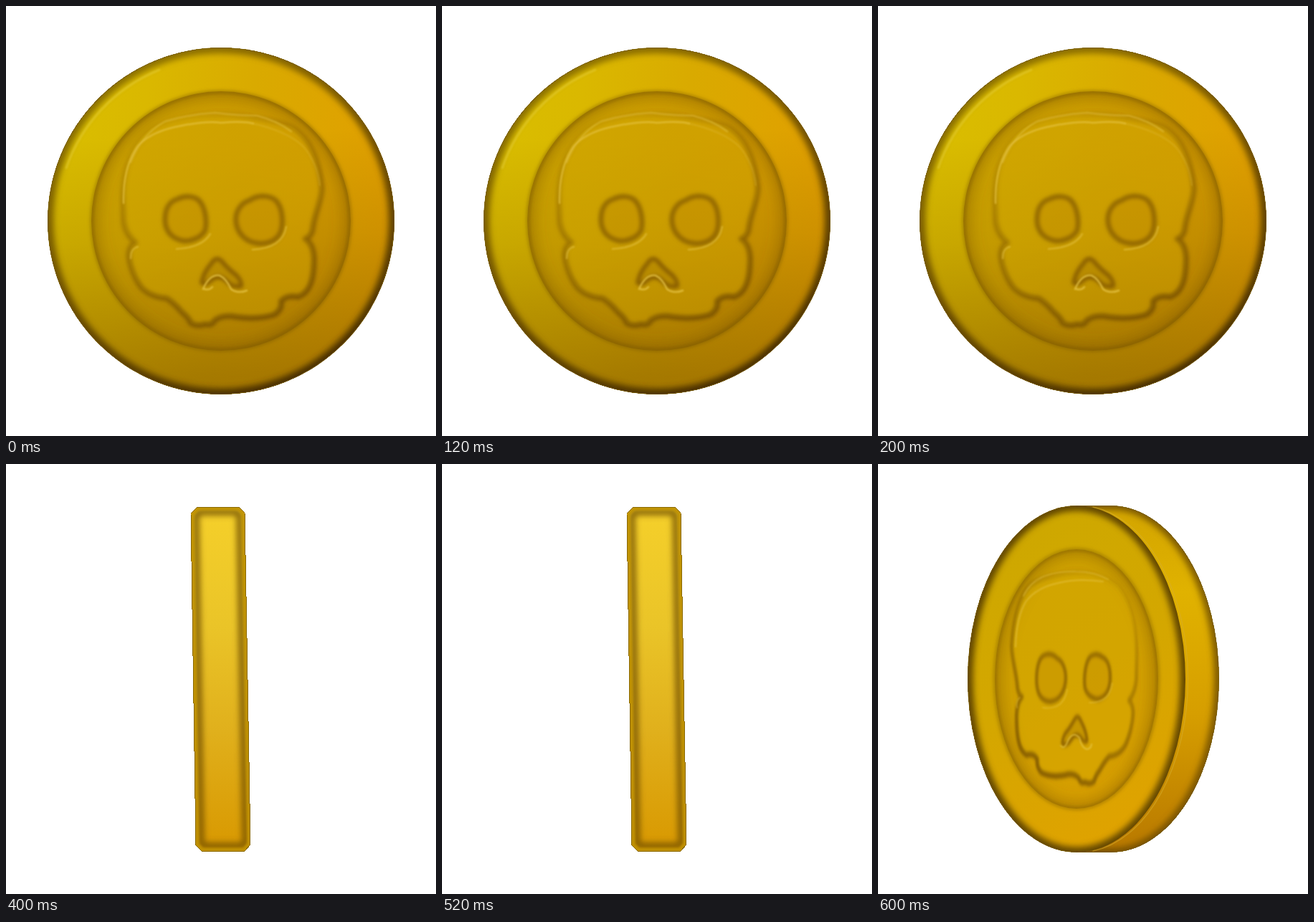
Write an HTML page that moves like this. It is 600 px wide and 600 px high and loops after 0.8 s.

```html
<!DOCTYPE html>
<html lang="en">
<head>
<meta charset="utf-8">
<title>Spinning coin</title>
<style>
  html, body { margin: 0; width: 100%; height: 100%; overflow: hidden; background: #fff; }
  svg { display: block; width: 100vw; height: 100vh; }
  .pose { visibility: hidden; animation: 800ms step-end infinite; }
  .front { animation-name: front; }
  .edge { animation-name: edge; }
  .tilt { animation-name: tilt; }
  @keyframes front { 0% { visibility: visible; } 50%, 100% { visibility: hidden; } }
  @keyframes edge { 0% { visibility: hidden; } 50% { visibility: visible; } 75%, 100% { visibility: hidden; } }
  @keyframes tilt { 0% { visibility: hidden; } 75%, 100% { visibility: visible; } }
  .line { fill: none; stroke-linecap: round; stroke-linejoin: round; }
  .crisp { shape-rendering: crispEdges; }
</style>
</head>
<body>
<svg viewBox="0 0 600 600">
  <defs>
    <filter id="b1" x="-20%" y="-20%" width="140%" height="140%"><feGaussianBlur stdDeviation="1"/></filter>
    <filter id="b2" x="-20%" y="-20%" width="140%" height="140%"><feGaussianBlur stdDeviation="2.6"/></filter>
    <filter id="b4" x="-20%" y="-20%" width="140%" height="140%"><feGaussianBlur stdDeviation="4"/></filter>
    <filter id="b10" x="-20%" y="-20%" width="140%" height="140%"><feGaussianBlur stdDeviation="10"/></filter>

    <linearGradient id="gold" x1="0" y1=".35" x2="1" y2=".5">
      <stop offset="0" stop-color="#d9be00"/>
      <stop offset=".25" stop-color="#dab800"/>
      <stop offset=".55" stop-color="#d9aa00"/>
      <stop offset="1" stop-color="#e29e00"/>
    </linearGradient>
    <linearGradient id="fall" x1=".48" y1="0" x2=".52" y2="1">
      <stop offset=".25" stop-color="#8a6000" stop-opacity="0"/>
      <stop offset=".55" stop-color="#8a6000" stop-opacity=".22"/>
      <stop offset=".95" stop-color="#8a6000" stop-opacity=".66"/>
    </linearGradient>
    <linearGradient id="rim" x1=".2" y1="0" x2=".7" y2="1">
      <stop offset="0" stop-color="#7a6000" stop-opacity=".75"/>
      <stop offset=".5" stop-color="#664800" stop-opacity=".9"/>
      <stop offset="1" stop-color="#452c00"/>
    </linearGradient>
    <linearGradient id="dish" x1=".35" y1="0" x2=".6" y2="1">
      <stop offset="0" stop-color="#bc8800" stop-opacity=".5"/>
      <stop offset=".5" stop-color="#bc8a00" stop-opacity=".42"/>
      <stop offset="1" stop-color="#a87600" stop-opacity=".35"/>
    </linearGradient>
    <linearGradient id="carve" x1=".2" y1="0" x2=".6" y2="1">
      <stop offset="0" stop-color="#8a6000" stop-opacity=".1"/>
      <stop offset=".35" stop-color="#805800" stop-opacity=".4"/>
      <stop offset="1" stop-color="#704a00" stop-opacity=".75"/>
    </linearGradient>
    <linearGradient id="bar" x1="0" y1="0" x2="0" y2="1">
      <stop offset="0" stop-color="#f5d02a"/>
      <stop offset=".35" stop-color="#eac428"/>
      <stop offset=".65" stop-color="#e0b01c"/>
      <stop offset="1" stop-color="#d89800"/>
    </linearGradient>
    <linearGradient id="warm" x1=".3" y1="0" x2=".65" y2="1">
      <stop offset="0" stop-color="#cda800"/>
      <stop offset=".5" stop-color="#d4a700"/>
      <stop offset="1" stop-color="#e0a200"/>
    </linearGradient>
    <linearGradient id="side" x1="0" y1="0" x2="0" y2="1">
      <stop offset="0" stop-color="#d2a400"/>
      <stop offset=".25" stop-color="#e0b200"/>
      <stop offset=".6" stop-color="#d69e00"/>
      <stop offset="1" stop-color="#b87800"/>
    </linearGradient>

    <path id="skull" d="M163 270C162 230 172 194 204 170C232 155 268 151 296 151C330 152 372 157 398 168C426 183 438 220 441 254C440 276 430 290 428 312Q426 322 418 325Q429 332 430 352C430 380 425 400 408 406Q392 403 384 412Q386 424 374 431Q350 438 322 434Q304 430 292 438Q287 447 278 444Q268 448 258 443Q254 434 246 428Q234 414 224 408Q200 406 188 392C179 380 172 362 171 347Q172 335 180 330Q166 318 164 300Z"/>
    <g id="eyes">
      <path d="M222 302C221 286 226 273 240 269C250 264 262 265 269 271C278 280 281 300 278 313C273 323 260 328 249 328C235 326 224 318 222 302Z"/>
      <path d="M321 302C319 288 327 275 340 271C354 262 374 264 380 276C386 286 388 306 382 318C376 329 362 333 350 331C335 329 323 318 321 302Z"/>
    </g>
    <path id="nose" d="M273 386Q276 371 286 360Q293 348 301 356Q311 368 322 376Q330 386 328 391Q317 393 310 386Q298 373 287 382Q278 391 273 386Z"/>
    <g id="relief">
      <use href="#skull" fill="#dcb200" fill-opacity=".25"/>
      <g class="line" filter="url(#b2)">
        <use href="#skull" stroke="url(#carve)" stroke-width="8"/>
        <use href="#eyes" fill="#b87c00" fill-opacity=".22" stroke="#7a5200" stroke-opacity=".66" stroke-width="7"/>
        <use href="#nose" fill="#a07000" fill-opacity=".3" stroke="#704800" stroke-opacity=".65" stroke-width="6"/>
      </g>
    </g>

    <clipPath id="disc"><circle cx="300" cy="300" r="242"/></clipPath>
    <clipPath id="well"><circle cx="300" cy="300" r="181"/></clipPath>
    <clipPath id="oval"><ellipse cx="277" cy="300" rx="152" ry="242"/></clipPath>
    <clipPath id="ovalWell"><ellipse cx="277" cy="300" rx="114" ry="181"/></clipPath>
    <path id="hull" d="M277 58H325A151 242 0 0 1 325 542H277Z"/>
    <clipPath id="body"><use href="#hull"/></clipPath>
    <path id="slab" d="M267 60H325L333 68L341 531L333 540H273L265 532L258 69Z"/>
    <clipPath id="slabClip"><use href="#slab"/></clipPath>
  </defs>

  <g class="pose front">
    <g clip-path="url(#disc)">
      <circle cx="300" cy="300" r="242" fill="url(#gold)"/>
      <circle cx="300" cy="300" r="242" fill="url(#fall)"/>
      <circle class="line" cx="300" cy="300" r="243" stroke="url(#rim)" stroke-width="18" filter="url(#b4)"/>
      <path class="line" d="M84 226A228 228 0 0 1 214 89" stroke="#eeda50" stroke-opacity=".35" stroke-width="3" filter="url(#b1)"/>
    </g>
    <g clip-path="url(#well)">
      <circle cx="300" cy="300" r="181" fill="url(#dish)"/>
      <circle class="line" cx="300" cy="300" r="183" stroke="#765200" stroke-opacity=".4" stroke-width="22" filter="url(#b10)"/>
    </g>
    <circle class="line" cx="300" cy="300" r="180" stroke="#755400" stroke-opacity=".6" stroke-width="4" filter="url(#b2)"/>
    <use href="#relief"/>
    <g class="line" stroke="#e6c444" stroke-width="2.5" filter="url(#b1)">
      <path stroke-opacity=".5" d="M174 218Q190 178 222 161Q255 151 292 149Q326 153 350 153Q378 160 398 175"/>
      <path stroke-opacity=".7" d="M164 275Q163 225 184 195Q204 174 245 167Q282 160 300 163Q330 160 345 164"/>
      <path stroke-opacity=".25" d="M345 164Q390 174 414 195Q434 218 438 250"/>
      <path stroke-opacity=".55" d="M174 352Q174 338 184 336M238 339Q274 337 285 318M344 340Q386 338 391 308"/>
      <path stroke-opacity=".8" d="M275 395Q284 374 298 376Q307 380 314 395Q323 402 336 397M277 395Q284 397 288 392"/>
    </g>
    <circle class="line crisp" cx="300" cy="300" r="241.5" stroke="#705500" stroke-opacity=".75"/>
  </g>

  <g class="pose edge">
    <g clip-path="url(#slabClip)">
      <use href="#slab" fill="url(#bar)"/>
      <path class="line" d="M273 67H320Q326 67 326 74L334 526Q334 533 327 533H279Q272 533 272 526L265 75Q265 67 273 67Z" stroke="#735000" stroke-opacity=".85" stroke-width="9" filter="url(#b4)"/>
      <use href="#slab" class="line" stroke="#c09200" stroke-width="9" stroke-opacity=".85" filter="url(#b1)"/>
    </g>
    <use href="#slab" class="line crisp" stroke="#8a6800" stroke-width="1"/>
  </g>

  <g class="pose tilt">
    <g clip-path="url(#body)">
      <use href="#hull" fill="url(#side)"/>
      <path class="line" d="M277 57H325A151 243 0 0 1 325 543H277" stroke="#684800" stroke-opacity=".8" stroke-width="14" filter="url(#b4)"/>
    </g>
    <path class="line crisp" d="M277 58.5H325A150.5 241.5 0 0 1 325 541.5H277" stroke="#705500" stroke-opacity=".7"/>
    <g clip-path="url(#oval)">
      <ellipse cx="277" cy="300" rx="152" ry="242" fill="url(#warm)"/>
      <ellipse class="line" cx="277" cy="300" rx="153" ry="243" stroke="#5c4200" stroke-opacity=".95" stroke-width="17" filter="url(#b4)"/>
    </g>
    <path class="line" d="M300 60A152 242 0 0 1 300 540" stroke="#d8b030" stroke-opacity=".5" stroke-width="1.5"/>
    <g clip-path="url(#ovalWell)">
      <ellipse cx="277" cy="300" rx="114" ry="181" fill="#c89200" fill-opacity=".35"/>
      <ellipse class="line" cx="277" cy="300" rx="115" ry="183" stroke="#765200" stroke-opacity=".4" stroke-width="20" filter="url(#b10)"/>
    </g>
    <ellipse class="line" cx="277" cy="300" rx="113.5" ry="180.5" stroke="#755400" stroke-opacity=".55" stroke-width="4" filter="url(#b2)"/>
    <use href="#relief" transform="translate(275 0) scale(-.628 1) translate(-300 0)"/>
    <g class="line" stroke="#e6c444" stroke-width="2" filter="url(#b1)">
      <path stroke-opacity=".5" d="M203 184Q212 165 231 157Q252 149 276 150Q302 150 321 161"/>
      <path stroke-opacity=".6" d="M192 255Q193 213 207 191Q222 172 252 166Q278 159 314 164"/>
      <path stroke-opacity=".45" d="M230 340Q259 344 264 315M295 333Q323 334 327 306M194 340Q192 330 198 326"/>
      <path stroke-opacity=".75" d="M255 393Q260 400 265 386Q272 372 281 382Q284 396 291 398Q297 398 298 391"/>
    </g>
    <path class="line crisp" d="M277 58.5A151.5 241.5 0 0 0 277 541.5" stroke="#705500" stroke-opacity=".75"/>
  </g>
</svg>
</body>
</html>
```
